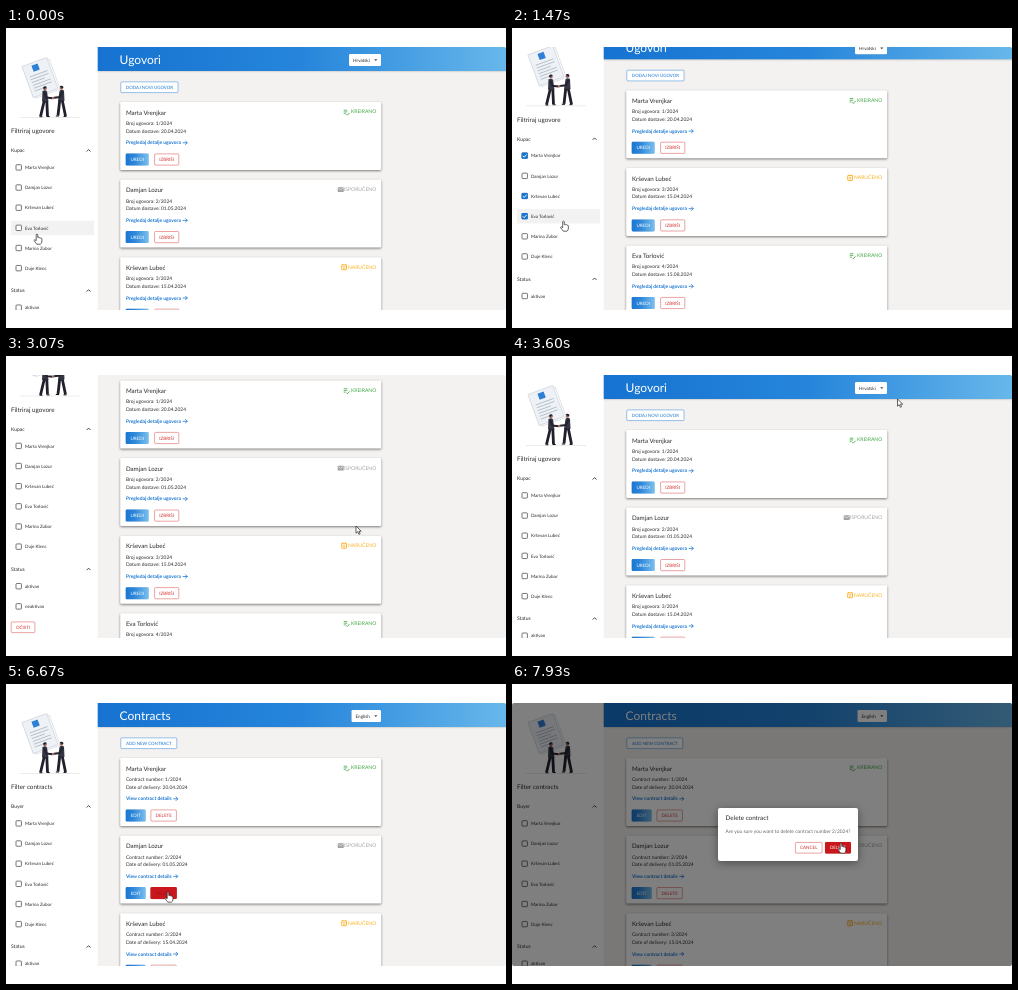
An HTML page for the animation above (8 s loop, 500 px wide and 300 px high).

```html
<!DOCTYPE html>
<html lang="hr">
<head>
<meta charset="utf-8">
<title>Ugovori</title>
<style>
  html, body { margin: 0; width: 100%; height: 100%; overflow: hidden; background: #fff; }
  svg { display: block; width: 500px; height: 300px; }
  text { font-family: Lato, "Open Sans", sans-serif; text-rendering: geometricPrecision; white-space: pre; }
  .card { filter: drop-shadow(0 1.3px 1.1px rgba(0, 0, 0, .5)); }
  .bar { filter: drop-shadow(0 .6px .8px rgba(0, 0, 0, .3)); }
  .raised { filter: drop-shadow(0 .4px .4px rgba(0, 0, 0, .2)); }
  .popup { filter: drop-shadow(0 2px 4px rgba(0, 0, 0, .4)); }
  svg.hr .en, svg:not(.hr) .hr { display: none; }
</style>
</head>
<body>
<svg id="stage" class="hr" viewBox="0 0 500 300"></svg>
<script>
const LOOP = 8000, BLUE = '#1976d2', RED = '#d32f2f', INK = '#2b2b2b';
const ROW_Y = 139.5, ROW_STEP = 20.15, CARD_Y = 74, CARD_STEP = 77.6;

const buyers = ['Marta Vrenjkar', 'Damjan Lozur', 'Krševan Lubeć', 'Eva Torlović', 'Marina Zubor', 'Duje Klenc'];
const contracts = [
  ['20.04.2024', 'KREIRANO', '#43a847'],
  ['01.05.2024', 'ISPORUČENO', '#a3a3a3'],
  ['15.04.2024', 'NARUČENO', '#fbb124'],
  ['15.08.2024', 'KREIRANO', '#43a847'],
];

// Markup helpers; text is placed by the middle of its capitals.
const txt = (x, cy, s, size, fill = INK, more = '') =>
  `<text x="${x}" y="${cy + size * .36}" font-size="${size}" fill="${fill}" ${more}>${s}</text>`;
const box = (x, y, w, h, fill, more = '') =>
  `<rect x="${x}" y="${y}" width="${w}" height="${h}" fill="${fill}" ${more}/>`;
const line = (d, stroke, width = .8, more = '') =>
  `<path d="${d}" fill="none" stroke="${stroke}" stroke-width="${width}" ${more}/>`;
const both = (hr, en) => `<g class="hr">${hr}</g><g class="en">${en}</g>`;
const MID = 'text-anchor="middle"';

const outlined = (x, y, w, h, label, color, size = 4.5) =>
  box(x + .4, y + .4, w - .8, h - .8, '#fff', `rx="1" stroke="${color}" stroke-opacity=".55" stroke-width=".8"`) +
  txt(x + w / 2, y + h / 2, label, size, color, MID);
const filled = (x, y, w, h, label, fill, ink = '#fff') =>
  `<g class="raised">${box(x, y, w, h, fill, 'rx="1.3"')}</g>` + txt(x + w / 2, y + h / 2, label, 4.5, ink, MID);

const statusIcon = (kind, x, color) => ({
  KREIRANO: line(`M${x} 8.2h3.6M${x} 9.9h3.6M${x} 11.600h2`, color, .8) +
    line(`M${x + 2.600} 12.200l1 1 2.200-2.400`, color, .9),
  'ISPORUČENO': box(x, 7.6, 6, 4.8, color, 'rx=".6"') + line(`M${x + .6} 8.6l2.4 1.6 2.4-1.6`, '#fff', .6),
  'NARUČENO': box(x + .5, 7.6, 4.8, 5, 'none', `rx=".5" stroke="${color}" stroke-width=".9"`) +
    line(`M${x + 1.6} 9.4h2.6M${x + 1.6} 11h2.6M${x + 1.2} 6.8v1.4M${x + 4.6} 6.8v1.4`, color, .8),
})[kind];
const iconX = { KREIRANO: 223.5, 'ISPORUČENO': 217.5, 'NARUČENO': 221 };

function card(i) {
  const [date, status, color] = contracts[i];
  const lines = (number, delivery, link, arrow) =>
    txt(5.7, 21.2, `${number}: ${i + 1}/2024`, 4.9) + txt(5.7, 28.8, `${delivery}: ${date}`, 4.9) +
    txt(5.7, 40.6, link, 4.9, BLUE, 'font-weight="700"') +
    line(`M${arrow} 40.8h4.6m-2-2l2 2-2 2`, BLUE);
  return `<g id="card${i}"><g class="card">${box(0, 0, 261, 68, '#fff', 'rx="1.3"')}</g>
    ${txt(5.7, 10.4, buyers[i], 6.2)}
    ${statusIcon(status, iconX[status], color)}
    ${txt(256, 9.6, status, 5.05, color, 'text-anchor="end"')}
    ${both(
      lines('Broj ugovora', 'Datum dostave', 'Pregledaj detalje ugovora', 62.5) +
        filled(5.5, 51.5, 23, 12, 'UREDI', 'url(#button)') + outlined(34, 51.5, 25, 12, 'IZBRIŠI', RED),
      lines('Contract number', 'Date of delivery', 'View contract details', 53) +
        filled(5.5, 51.5, 20, 12, 'EDIT', 'url(#button)') + outlined(30.3, 51.5, 26.3, 12, 'DELETE', RED) +
        `<g id="hot${i}" opacity="0">${filled(30.3, 51.5, 26.3, 12, 'DELETE', '#c8181e', '#a01318')}</g>`)}
  </g>`;
}

function checkbox(y, label, i) {
  return box(10, y - 2.8, 5.4, 5.4, '#fff', 'rx=".7" stroke="#555" stroke-width=".8"') +
    `<g id="tick${i}" visibility="hidden">${box(9.6, y - 3.2, 6.2, 6.2, BLUE, 'rx=".8"')}
    ${line(`M10.9 ${y}l1.3 1.4 2.5-2.8`, '#fff', .9)}</g>` + txt(19, y, label, 4.5);
}

const chevron = y => line(`M80.7 ${y + 1}l1.9-1.9 1.9 1.9`, '#333', .9);

// A striding figure; the feet are given relative to the head.
const person = (x, y, flip, back, front) => `<g transform="translate(${x} ${y}) scale(${flip} 1)">
  <circle r="1.8" fill="#a56a62"/>
  <path d="M-1.9-.2a1.900 1.900 0 0 1 3.700-.8l-1.500.2-.6 1.400z" fill="#20202c"/>
  <path d="M-2.500 2.500q3-1.500 4.500.5l1.500 10h-6.500z" fill="#353544"/>
  <path d="M-1 3.500l2.500 5.500 6 .8" fill="none" stroke="#23232f" stroke-width="2"/>
  <path d="M-.8 12.500L${back} 28M1.800 12.500L${front} 27.500" stroke="#20202c" stroke-width="2.800"/>
  <path d="M${back - 1} 28.400h3M${front - 1} 28h3.200" stroke="#111"/></g>`;

const illustration = `
  <g transform="translate(34 49.500) rotate(-20)">
    ${box(-11, -14, 26, 32, '#fff', 'stroke="#cfd4da" stroke-width=".6"')}
    ${box(-13.2, -16.5, 26.4, 33, '#eef2f7', 'stroke="#c6cdd6" stroke-width=".6"')}
    ${box(-4, -14, 6.5, 6.5, '#2f7fd6')}
    ${line('M-9.500-4h19M-9.500-1h19M-9.500 2h14M-9.500 5h19M-9.500 8h19M-9.500 11h10', '#aeb8c4', .8)}
  </g>
  ${person(39, 60.500, 1, -4.500, 2.500)}${person(55.500, 60, -1, -4, 3.500)}
  <circle cx="47.2" cy="70" r="1.2" fill="#a56a62"/>
  ${line('M14 89.500h60', '#d8d8d8', .5)}`;

const sidebar = box(0, 0, 91.5, 400, '#fff') + illustration +
  both(txt(5, 103, 'Filtriraj ugovore', 6.3) + txt(5, 122.5, 'Kupac', 5),
       txt(5, 103, 'Filter contracts', 6.3) + txt(5, 122.5, 'Buyer', 5)) +
  chevron(122.5) + box(5, 0, 83, 14.4, '#f2f2f2', 'id="rowHover"') +
  buyers.map((name, i) => checkbox(ROW_Y + i * ROW_STEP, name, i)).join('') +
  txt(5, 262.6, 'Status', 5) + chevron(262.6) +
  checkbox(279.8, 'aktivan', 'Active') + checkbox(300, 'neaktivan', 'Inactive') +
  outlined(4.8, 315, 24.5, 11.5, 'OČISTI', RED);

const select = (x, w, label) => `<g class="raised">${box(x, 26, w, 12, '#fff', 'rx="1.3"')}</g>` +
  txt(x + 4, 32, label, 4.6) + '<path d="M368.2 31.2h3.2l-1.6 1.8z" fill="#444"/>';

const header = `<g class="bar">${box(91.5, 19, 409, 24, 'url(#header)')}</g>` +
  both(txt(113.6, 31.6, 'Ugovori', 12, '#fff') + select(343, 32, 'Hrvatski') +
         outlined(114.4, 53.5, 58, 11.5, 'DODAJ NOVI UGOVOR', BLUE, 4.4),
       txt(113.6, 31.6, 'Contracts', 12, '#fff') + select(345.5, 29.5, 'English') +
         outlined(114.4, 53.5, 56.8, 11.5, 'ADD NEW CONTRACT', BLUE, 4.4));

const menu = `<g id="menu" class="popup">${box(343, 39, 32, 34, '#fff', 'rx="1.3"')}
  ${box(343, 41.5, 32, 14, '#e3eefa')}${box(343, 56.5, 32, 14, '#f2f2f2', 'id="menuHover"')}
  ${txt(347, 48.5, 'Hrvatski', 4.6)}${txt(347, 63.5, 'English', 4.6)}</g>`;

const dialog = `<g id="dialog">${box(0, 19, 500, 263, '#000', 'opacity=".5"')}
  <g class="popup">${box(206, 124, 140, 53, '#fff', 'rx="2"')}</g>
  ${txt(213.6, 134, 'Delete contract', 6.3)}
  ${txt(213.6, 147.5, 'Are you sure you want to delete contract number 2/2024?', 4.9, '#666')}
  ${outlined(283, 158, 27.5, 11.5, 'CANCEL', RED)}${outlined(313, 158, 26, 11.5, 'DELETE', RED)}
  <g id="confirm">${filled(313, 158, 26, 11.5, 'DELETE', '#c8181e')}</g></g>`;

const pointers = `<g id="pointer" stroke="#222" stroke-width=".7" stroke-linejoin="round" fill="#fff">
  <path id="arrow" d="M0 0v7.2l1.7-1.5 1.2 2.6 1.2-.6-1.2-2.5h2.3z"/>
  <path id="hand" d="M-.8.6q.8-1.2 1.6 0v3q1-.6 1.5.2 1-.4 1.4.4 1.2-.2 1.2 1v2q0 2.4-1.6 3H-.2Q-1.4 8.8-3 6.4q.4-1.4 2.2.2z"/></g>`;

const stage = document.getElementById('stage');
stage.innerHTML = `<defs>
    <linearGradient id="header"><stop stop-color="#1673d1"/><stop offset=".5" stop-color="#2685db"/><stop offset="1" stop-color="#67b7ea"/></linearGradient>
    <linearGradient id="button"><stop stop-color="#1976d2"/><stop offset=".4" stop-color="#2f88da"/><stop offset="1" stop-color="#7cc0ee"/></linearGradient>
    <clipPath id="window"><rect y="19" width="500" height="263" rx="2"/></clipPath>
  </defs>
  <g clip-path="url(#window)">${box(91.5, 19, 409, 263, '#f4f2f0')}
    <g id="page">${header}${contracts.map((_, i) => card(i)).join('')}${sidebar}</g>
    ${menu}${dialog}${pointers}</g>`;

const el = Object.fromEntries([...stage.querySelectorAll('[id]')].map(e => [e.id, e]));
const set = (id, name, value) => el[id].setAttribute(name, value);
const show = (id, on) => set(id, 'visibility', on ? 'inherit' : 'hidden');

// Each step: time, then values; eased between steps.
const route = [
  [0, 31, 206], [70, 31, 206], [260, 30, 201], [380, 30, 201], [560, 28, 181], [700, 28, 181],
  [900, 28, 140], [1060, 28, 140], [1320, 51.5, 193], [1500, 51.5, 193], [1730, 53, 150], [1800, 53, 150],
  [2400, 17, 270], [2680, 17, 270], [3000, 350, 170], [3460, 350, 170], [3600, 385.5, 43],
  [3760, 362, 33], [3930, 362, 33], [4260, 392, 58], [4500, 358, 62], [4760, 358, 62],
  [5250, 304, 59], [5340, 304, 59], [5530, 160, 130], [5760, 158, 132], [6300, 162, 208],
  [7290, 162, 208], [7720, 329, 159], [8000, 329, 159],
];
const scrolling = [[0, 0], [1400, 0], [1470, 11.7], [1700, 49.5], [3090, 49.5], [3320, 0], [8000, 0]];
const handTimes = [[0, 1650], [2280, 2740], [3700, 4000], [4400, 4800], [5500, 5800], [6230, 7020], [7600, LOOP]];
const ticks = [[3, 320], [2, 640], [0, 1000]];
const CLEARED = 2700, TRANSLATED = 4800;

const ramp = (t, start, end) => Math.min(1, Math.max(0, (t - start) / (end - start)));
const pulse = (t, on, off, fade = 180) => ramp(t, on, on + fade) - ramp(t, off, off + fade);
const smooth = u => u * u * (3 - 2 * u);

function follow(steps, t) {
  const n = Math.max(1, steps.findIndex(s => s[0] > t));
  const [a, b] = [steps[n - 1], steps[n]];
  const u = smooth(ramp(t, a[0], b[0]));
  return a.slice(1).map((v, i) => v + (b[i + 1] - v) * u);
}

function draw(t) {
  const [x, y] = follow(route, t), [scroll] = follow(scrolling, t);
  set('page', 'transform', `translate(0 ${-scroll})`);
  set('pointer', 'transform', `translate(${x} ${y})`);
  const hand = handTimes.some(([a, b]) => t >= a && t < b);
  show('hand', hand);
  show('arrow', !hand);

  const row = Math.round((y + scroll - ROW_Y) / ROW_STEP);
  show('rowHover', t < 1560);
  set('rowHover', 'y', ROW_Y + row * ROW_STEP - 7.2);

  const chosen = ticks.filter(([, at]) => t >= at && t < CLEARED).map(([i]) => i);
  buyers.forEach((_, i) => show('tick' + i, chosen.includes(i)));
  let slot = 0;
  contracts.forEach((_, i) => {
    const visible = !chosen.length || chosen.includes(i);
    show('card' + i, visible);
    if (visible) set('card' + i, 'transform', `translate(114.2 ${CARD_Y + CARD_STEP * slot++})`);
  });

  stage.classList.toggle('hr', t < TRANSLATED);
  set('menu', 'opacity', pulse(t, 3870, 4740));
  show('menuHover', t > 4380);
  set('hot0', 'opacity', pulse(t, 5490, 5790));
  set('hot1', 'opacity', pulse(t, 6250, 6960));
  set('dialog', 'opacity', ramp(t, 6860, 7085));
  set('confirm', 'opacity', ramp(t, 7600, 7800));
}

const start = performance.now();
function tick() {
  draw((performance.now() - start) % LOOP);
  requestAnimationFrame(tick);
}
tick();
</script>
</body>
</html>
```
